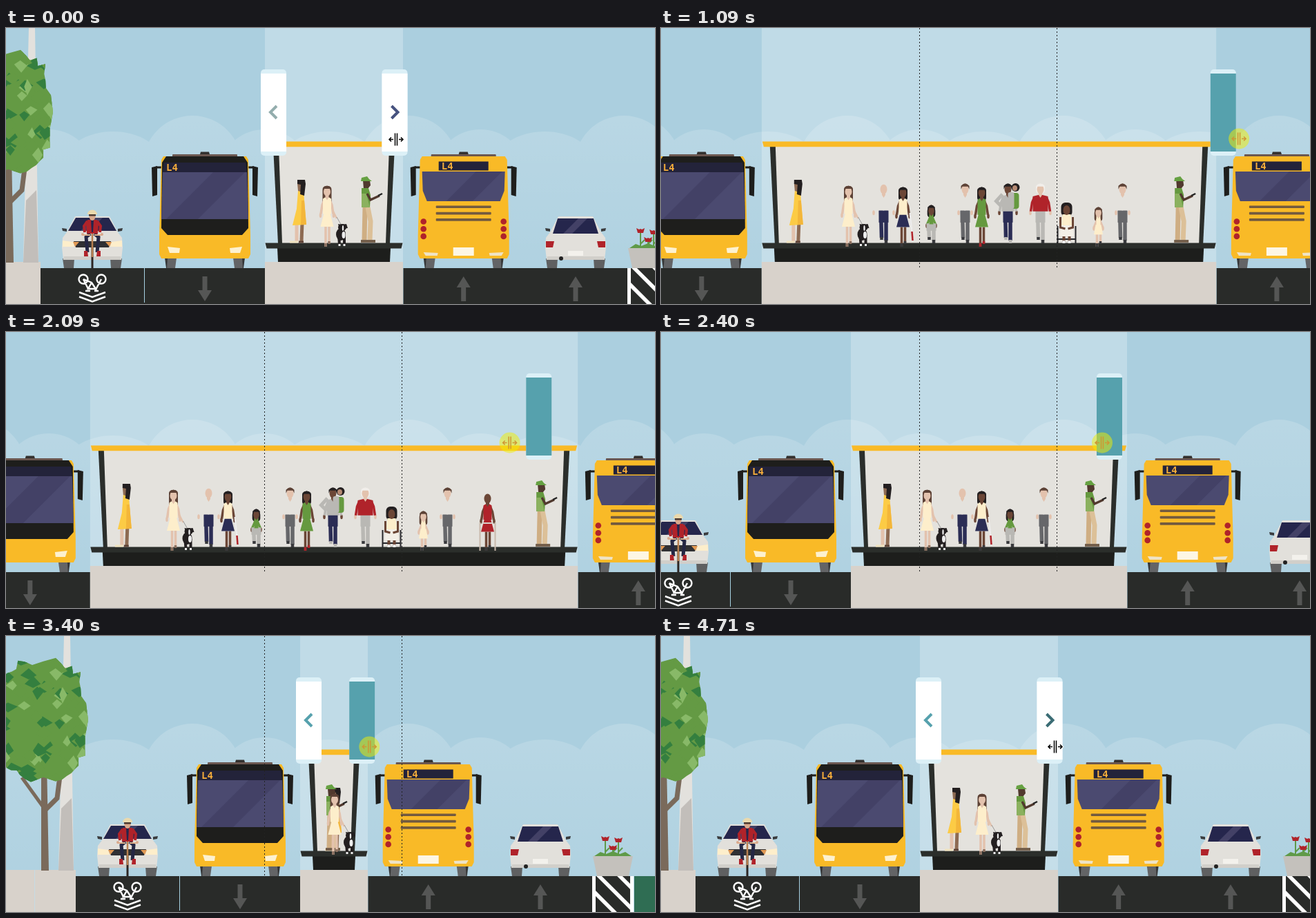
An HTML page that plays this animation: 940 by 400 pixels, repeating every 4.79 s.

```html
<!DOCTYPE html>
<html lang="en">
<head>
<meta charset="utf-8">
<title>Resizing a transit shelter</title>
<style>
html, body { margin: 0; width: 100%; height: 100%; overflow: hidden; background: #abcfdf; }
svg { display: block; width: 100%; height: 100%; }
.led { font: bold 14px "DejaVu Sans Mono", monospace; fill: #f6ad3a; }
</style>
</head>
<body>
<svg id="stage" viewBox="0 0 940 400" xmlns="http://www.w3.org/2000/svg"></svg>
<script>
const LOOP = 4790, START = 170, STEP = 76.9, MID = 475, RELEASE = 57;
const YELLOW = '#f9ba27', ROAD = '#292b29', PAVE = '#d8d2cb', NAVY = '#2b2d55', TEAL = '#56a1ad', GLASS = '#25264c';
const PALE = '#e3c2ad', DARK = '#6b4636', BLACK = '#1e1e1c', CREAM = '#fdeecb', GREEN = '#65993f', RED = '#b0232a';
const GREY = '#66676a', ASH = '#b9b8b4', BROWN = '#5d4236', INK = '#231f20', SAND = '#e9d6a4';

// ---- markup helpers ----
const poly = (fill, pts) => `<polygon fill="${fill}" points="${pts}"/>`;
const rect = (fill, x, y, w, h, r = 0) => `<rect fill="${fill}" x="${x}" y="${y}" width="${w}" height="${h}" rx="${r}"/>`;
const oval = (fill, x, y, rx, ry = rx) => `<ellipse fill="${fill}" cx="${x}" cy="${y}" rx="${rx}" ry="${ry}"/>`;
const line = (color, w, d) => `<path d="${d}" fill="none" stroke="${color}" stroke-width="${w}"/>`;
const at = (x, body) => `<g transform="translate(${x} 0)">${body}</g>`;
const both = body => body + `<g transform="scale(-1 1)">${body}</g>`;
const each = (list, f) => list.map(f).join('');

// Mirrored shape: half widths paired with heights, from top to bottom.
function hull(fill, ...half) {
  const right = [], left = [];
  for (let i = 0; i < half.length; i += 2) {
    right.push(half[i] + ',' + half[i + 1]);
    left.unshift(-half[i] + ',' + half[i + 1]);
  }
  return poly(fill, [...right, ...left].join(' '));
}

function seeded(seed) {
  return () => (seed = seed * 16807 % 2147483647) / 2147483647;
}

// ---- backdrop ----
function clouds() {
  let d = '';
  for (let k = -1; k < 4; k++)
    for (const [x, y, rx, ry] of [[62, 195, 58, 48], [155, 195, 70, 45], [270, 200, 72, 73]])
      d += `M${x + k * 312.5 - rx} ${y}a${rx} ${ry} 0 0 1 ${2 * rx} 0V348h${-2 * rx}z`;
  return `<path d="${d}" fill="url(#haze)"/>`;
}

// ---- vehicles, centred on x = 0 ----
const glare = (x, y0, y1, w) => poly('#434166', `${x},${y0} ${x + w},${y0} ${x + w - (y1 - y0)},${y1} ${x - (y1 - y0)},${y1}`);

const busShell =
  rect('#6b5750', -47, 183, 94, 4, 1) + hull('#33302e', 6, 179.5, 7, 183) +
  both(poly('#353637', '47,333 58,333 56,348 47,348') + poly('#636466', '41,333 54,333 55,348 43,348') +
    line(BLACK, 3, 'M62 202H71') + poly(BLACK, '69,200 77,202 76,244 69,242')) +
  hull(YELLOW, 60, 186, 63, 191, 66, 300, 66, 328, 63, 334);

const busFront = busShell +
  hull(BLACK, 56, 186, 62, 195, 63, 290, 54, 300) + hull('#23233a', 59, 195, 61, 209) +
  hull('#4b4a70', 61, 209, 63, 277) + glare(12, 209, 277, 46) +
  '<text class="led" x="-56" y="206.5">L4</text>' +
  both(poly('#fdf1cf', '36,319 54,317 51,326 37,326'));

const busBack = busShell +
  rect('#23233a', -36, 193.5, 72, 13) + '<text class="led" x="-32" y="205">L4</text>' +
  hull('#4b4a70', 60, 208, 59, 236, 53, 251) + glare(18, 208, 251, 38) +
  each([0, 1, 2], i => rect('#725a3f', -40, 257.5 + i * 9.3, 80, 3.6, 1)) +
  both(each([0, 1, 2], i => oval(RED, 58, 280.5 + i * 10.7, 4.3)) + poly('#efe3c5', '37,326 58,325 55,330 38,330')) +
  rect('#fdf6e4', -15, 318, 30, 12);

const carShell =
  both(poly('#5f6061', '26,334 43,334 41,348 27,348') + poly('#3a3b3d', '37,291 44,290 43,294 37,295')) +
  hull('#e2e0db', 25, 273, 37, 296, 43, 304, 44, 318, 42, 336) + hull('#d1cfca', 41, 331, 42, 336);

const carFront = carShell + hull(GLASS, 24, 275, 35, 294) + glare(2, 275, 294, 13) +
  hull('#303033', 27, 309, 24, 318) +
  both(poly(CREAM, '28,310 43,308 43,317 26,317') + poly('#e29a55', '19,310 28,310 25,317'));

const carBack = carShell + hull(GLASS, 26, 276, 33, 298) + glare(4, 276, 298, 13) +
  both(poly(RED, '31,309 43,309 43,318 33,318')) + rect('#f3f1ec', -11, 323, 22, 7) + oval('#222', -21, 334, 3);

const cyclist =
  line('#2c2523', 3, 'M0 318V348') + line('#b98050', 2.5, 'M0 298V332') +
  both(line('#252744', 5, 'M3 298L9 303L7 325') + poly(RED, '7,323 12,323 12,331 6,331') + line(RED, 4, 'M7 280L12 287L11 296')) +
  hull(RED, 7, 278, 9, 284, 8, 298) + hull(GLASS, 2, 278, 1, 296) +
  both(line('#e0b08c', 2, 'M3 300H15') + oval('#d9a98d', 14, 299, 2)) +
  oval('#d9a98d', 0, 273, 4.5, 6) + rect('#4c3930', -5, 270, 10, 2.5) + '<path fill="#ead9ae" d="M-7 270a7 6.5 0 0 1 14 0z"/>';

const bikeMark = line('#fff', 2.4,
  each([-19.5, 6.5], x => `M${x} 364a6.5 6.5 0 1 0 13 0a6.5 6.5 0 1 0 -13 0`) +
  'M-13 364L-1 369L5 378H-6L-1 369M-6 378L-13 364M13 364L4 381M-10 381H-3M3 381H9' +
  each([383, 389.5], y => `M-19 ${y}L0 ${y + 7}L19 ${y}`));

const arrow = hull('#555655', 3.5, 360, 3.5, 380, 10, 380, 0, 396);
const arrowUp = `<g transform="translate(0 756) scale(1 -1)">${arrow}</g>`;

// ---- street furniture ----
function foliage() {
  const rand = seeded(11), tones = ['#649a44', '#347f3f', '#649a44', '#347f3f', '#88b968'];
  const round = v => Math.sign(v) * Math.abs(v) ** 0.65;
  const blob = (x, y, rx, ry, count, rough) => Array.from({ length: count }, (_, i) => {
    const a = i / count * 2 * Math.PI, r = 1 - rough * rand();
    return `${(x + rx * r * round(Math.cos(a))).toFixed(1)},${(y + ry * r * round(Math.sin(a))).toFixed(1)}`;
  }).join(' ');
  const edge = blob(43, 122, 65, 92, 44, 0.14);
  let shards = '';
  for (let i = 0; i < 75; i++)
    shards += poly(tones[i % 5], blob(rand() * 130 - 22, 34 + rand() * 180, i % 5 < 4 ? 16 : 11, 13, 4, 0.6));
  return `<clipPath id="crown">${poly('#000', edge)}</clipPath>${poly(tones[0], edge)}<g clip-path="url(#crown)">${shards}</g>`;
}

const tree = poly('#7a6a5b', '40,340 40,180 48,180 51,340') +
  line('#7a6a5b', 7, 'M46 252L63 235L70 180') + line('#7a6a5b', 5, 'M43 248L12 205') + foliage();
const pole = poly('#e3e1dd', '73,0 82,0 87,340 65,340') + poly('#c2beba', '69,250 84,235 87,340 65,340');

const tulip = (x, y) => line('#5f9a48', 2, `M${x} ${y}V318m0 -5l6 -6`) +
  at(x, hull(RED, 0, y - 3, 2, y - 2, 6, y - 4, 4, y + 3));
const planter = tulip(-11, 294) + tulip(8, 296) + tulip(0, 307) +
  hull('#5f9a48', 0, 312, 10, 316, 18, 313, 27, 319) + hull('#c4c1bc', 29, 319, 23, 348);

const hatch = rect(ROAD, 0, 348, 60, 52) +
  `<g clip-path="url(#lot)">${line('#fff', 5.5, each([-1, 0, 1], k => `M${5 + 30 * k} 343l60 60`))}</g>` +
  line('#fff', 5, 'M2.5 348V400M57.5 348V400');

// ---- people, centred on x = 0, built from body proportions ----
function fig({ tall = 86, skin = PALE, hair, long = 0, top, sleeve = skin, w = 8, legs, skirt, shoe = '#38393c' }) {
  const foot = skirt ? 317 : 312, up = k => foot - tall * k;
  const head = up(0.91), sh = up(0.79), hip = up(0.55), hem = up(0.33), r = tall > 70 ? 5 : 4.3;
  let out = hair && long ? rect(hair, -r - 1.5, up(1), 2 * r + 3, long, 5) : '';
  out += both(oval(skin, w + 1.5, hip + 3, 1.8, 3.5));
  if (top) out += both(line(sleeve, 3.5, `M${w - 4} ${sh + 2}L${w - 1} ${sh + 9}L${w + 1} ${hip + 1}`));
  if (skirt) {
    out += line(skin, 3.5, `M-2 ${hem}V${foot}M3 ${hem}V${foot - 5}`) + line(shoe, 3.5, `M-2 ${foot - 5}v5M3 ${foot - 8}v4`);
    out += hull(skirt, 4, hip - 2, w + 1.5, hem);
  } else {
    out += line(legs, 5.5, `M-4 ${hip}L-3 ${foot - 8}M3.5 ${hip}V${foot - 4}`) + rect(legs, -7, hip, 14, tall / 5);
    out += line(shoe, 4.5, `M-3 ${foot - 9}v4M3.5 ${foot - 5}v5`);
  }
  if (top) out += hull(top, 3, sh - 2, w - 2, sh, w - 2, hip + 1);
  out += hull(skin, 2.5, head + 4, 2.5, sh - 2, 0, sh + 2) + oval(skin, 0, head, r, r + 2);
  if (hair) out += `<path fill="${hair}" d="M${-r - 1} ${head}v-5q${r + 1} -7 ${2 * r + 2} 0v5l-2 -4h${2 - 2 * r}z"/>`;
  return out;
}

const stick = (color, x, y) => line(color, 2, `M${x} ${y}V317`);

const yellowWoman =
  line(PALE, 5, 'M-4 282V309') + line('#8d6a52', 5, 'M4 282L3 309') + line('#f0e3bf', 3, 'M-14 310H-2') + line(BROWN, 3, 'M-1 310H6') +
  poly('#fccb45', '-2,236 6,236 8,262 10,285 -10,286 -4,262') + poly('#f3b63a', '3,250 7,250 10,285 2,285') +
  poly('#8d6a52', '-3,225 3,225 4,238 -2,236') + poly(INK, '-3,220 8,220 9,226 7,243 1,241 2,227 -3,226');

const dog = line('#999', 1, 'M14 274L22 288') + line(INK, 4, 'M17 300L18 314M25 300V314') +
  oval(INK, 20, 299, 7, 9) + oval(INK, 22, 289, 6, 5) + poly(INK, '16,284 21,285 28,284 30,290 18,291') +
  oval('#eee', 24, 300, 2.5, 5) + oval('#eee', 23, 290, 1.2, 4) + line('#eee', 3, 'M18 313v3M25 313v3');

const woman = { tall: 86, long: 20, hair: INK, skin: DARK };
const greenWoman = fig({ ...woman, top: GREEN, skirt: GREEN, shoe: RED });
const greyMan = fig({ hair: BROWN, legs: GREY });
const girl = fig({ tall: 88, hair: BROWN, long: 28, top: CREAM, skirt: CREAM, shoe: '#8b7060' }) + line(PALE, 2.5, 'M8 264L14 276') + dog;

const hatMan =
  line('#cfae83', 7, 'M-3 260L-4 307') + line('#dcc098', 7, 'M1 260L5 280L4 307') + line('#75604c', 4, 'M-9 309H3M1 309H12') +
  poly('#51392e', '-6,221 4,221 5,228 1,233 -5,233') + poly('#66a142', '-9,222 -8,217 0,215 3,219 7,222') +
  poly(GREEN, '-8,232 2,232 5,242 4,260 -8,260') + poly('#8bb15f', '-8,240 -1,240 4,260 -8,260') +
  line('#51392e', 3.5, 'M0 240L5 249L18 243') + line('#222', 2.5, 'M16 243L22 240');

const seated = line('#26262a', 2, 'M-13 287V312M13 287V312M-13 306H13') +
  both(line(DARK, 4, 'M4 300V310') + line('#eee', 4, 'M4 308v4')) + rect(INK, -8, 253, 16, 20, 6) +
  hull(CREAM, 6, 270, 8, 290) + hull('#f3efe7', 9, 286, 10, 302) + both(line(DARK, 3, 'M9 274V289L2 291')) + oval(DARK, 0, 264, 5, 7);

const carer = fig({ skin: DARK, hair: INK, top: ASH, sleeve: ASH, w: 11, legs: NAVY, shoe: ASH }) +
  line(ASH, 5, 'M-8 241L-17 251L-9 259') + rect(GREEN, 5, 239, 11, 23, 4) + rect(ASH, 0, 238, 9, 24, 3) + oval(INK, 11, 231, 6) + oval('#b58a73', 10, 232, 3.5, 4);

// Each person in line, with the gap to the person before.
const cast = [
  [0, yellowWoman],
  [0, girl],
  [51, fig({ legs: NAVY, w: 13 })],
  [28, fig({ ...woman, top: CREAM, skirt: NAVY }) + line('#eee', 2, 'M10 268L13 296') + line(RED, 2.5, 'M13 295L14 308')],
  [41, fig({ tall: 52, skin: DARK, hair: INK, long: 15, top: GREEN, sleeve: GREEN, legs: ASH, w: 5 })],
  [49, greyMan],
  [24, greenWoman],
  [38, carer],
  [47, fig({ hair: '#f1eeea', long: 14, top: RED, sleeve: RED, legs: ASH, w: 13 })],
  [38, seated],
  [46, fig({ tall: 54, hair: BROWN, long: 18, top: CREAM, skirt: CREAM, w: 5 })],
  [35, greyMan],
  [58, fig({ tall: 83, skin: DARK, top: RED, skirt: RED }) + rect(PAVE, -8, 276, 16, 2) + both(stick('#c9b9ab', 11, 276))],
  [62, fig({ top: NAVY, sleeve: NAVY, legs: GREY, w: 15 }) + stick('#a88d78', 16, 266)],
  [32, greenWoman],
  [41, fig({ tall: 93, top: GREEN, legs: NAVY, w: 9 })],
  [54, fig({ tall: 92, skin: DARK, top: SAND, sleeve: SAND, legs: GREY, w: 10 })],
];

// ---- scene ----
const leftSide =
  rect(PAVE, -900, 339, 575, 61) + rect('#c6dbe3', -385, 339, 1, 61) +
  rect(ROAD, -325, 348, 325, 52) + rect('#a8d3e3', -175, 348, 1, 50) +
  at(-415, pole + tree) + at(-250, carFront + cyclist + bikeMark) + at(-87, busFront + arrow);
const rightSide =
  rect(ROAD, 0.5, 348, 325, 52) + rect('#2f6d53', 386, 348, 500, 52) + at(325, hatch) + at(355, planter) +
  at(87.7, busBack + arrowUp) + at(250, carBack + arrowUp);
const handle = (id, d) => `<g id="${id}">${rect('#dcf0f7', 0, 60, 37, 125, 5)}<rect id="${id}Fill" y="66" width="37" height="113" fill="#fff"/>` +
  `<path id="${id}Mark" d="${d}" fill="none" stroke-width="4"/></g>`;
const arrows = 'M-1.5 -9V9M1.5 -9V9M-4 0H-10M-7 -3L-10 0L-7 3M4 0H10M7 -3L10 0L7 3';

const $ = id => document.getElementById(id);
const set = (id, attrs) => { for (const k in attrs) $(id).setAttribute(k, attrs[k]); };
const show = (id, on) => { $(id).style.display = on ? '' : 'none'; };
const move = (id, x, y = 0) => set(id, { transform: `translate(${x.toFixed(2)} ${y})` });

$('stage').innerHTML =
  `<defs><linearGradient id="haze" x1="0" y1="127" x2="0" y2="348" gradientUnits="userSpaceOnUse">
    <stop stop-color="#fff" stop-opacity=".17"/><stop offset="1" stop-color="#fff" stop-opacity=".06"/></linearGradient>
    <clipPath id="lot"><rect y="348" width="60" height="52"/></clipPath></defs>` +
  rect('#abcfdf', 0, 0, 940, 400) + clouds() +
  '<rect id="glow" height="400" fill="#fff" opacity=".25"/>' +
  `<g id="left">${leftSide}</g><g id="right">${rightSide}</g><g id="shelter"></g>` +
  cast.map(([, body], i) => `<g id="p${i}">${body}</g>` + (i ? '' : `<g id="hat">${hatMan}</g>`)).join('') +
  '<path id="guides" d="M374.5 0V348M573.5 0V348" stroke="#222" stroke-dasharray="2 3"/>' +
  handle('hl', 'M23 113L14 122L23 131') + handle('hr', 'M14 113L23 122L14 131') +
  `<g id="cursor"><circle id="disc" r="15" fill="#f2f000"/><path id="halo" d="${arrows}" fill="none" stroke="#fff" stroke-width="3.5"/>` +
  `<path id="icon" d="${arrows}" fill="none" stroke-width="1.5"/></g>`;

// ---- motion: the pointer follows a few [step, x] points; handle and shelter trail behind it ----
const path = [[0, 565], [5, 675], [7, 728], [17, 895], [20, 895], [27, 665], [29, 639], [34, 525], [40, 514], [44, 543], [51, 565], [56, 565], [59, 571]];

function pointer(n) {
  if (n <= 0) return path[0][1];
  const i = path.findIndex(k => k[0] > n) - 1;
  if (i < 0) return path[path.length - 1][1];
  const slope = j => j >= 0 && path[j + 1] ? (path[j + 1][1] - path[j][1]) / (path[j + 1][0] - path[j][0]) : 0;
  const tangent = j => {
    const a = slope(j - 1), b = slope(j);
    return a * b > 0 ? 2 * a * b / (a + b) : 0;
  };
  const [x0, y0] = path[i], [x1, y1] = path[i + 1], h = x1 - x0, u = (n - x0) / h, v = 1 - u;
  return v * v * (1 + 2 * u) * y0 + u * u * (3 - 2 * u) * y1 + h * u * v * (v * tangent(i) - u * tangent(i + 1));
}
const trail = (n, lag) => pointer(Math.min(n - lag, RELEASE - 2));

const mix = (a, b, k) => 'rgb(' + a.map((v, i) => Math.round(v + (b[i] - v) * k)) + ')';

function drawShelter(L, R) {
  const half = (R - L) / 2;
  const post = poly('#2b2e2b', `${half - 12},172 ${half - 20},172 ${half - 25},312 ${half - 19},312`);
  $('shelter').innerHTML = at(MID,
    rect(PAVE, -half, 339, 2 * half, 61) + hull('#e4e2dd', half - 16, 172, half - 22, 312) + both(post) +
    hull(YELLOW, half - 1, 164.5, half - 3, 172.3) +
    hull('#1d1e1c', half - 18, 319, half - 19, 339) + hull('#2b2e2b', half - 0.5, 311.5, half - 2.5, 319.5));
}

// The middle group keeps its spacing; the first and last gaps share the slack.
function placePeople(L, R) {
  const span = R - L - 102;
  let last = 1, width = 0;
  while (cast[last + 1] && span - width - cast[last + 1][0] >= 108) width += cast[++last][0];
  move('p0', L + 50);
  let x = L + 50 + Math.max(0, (span - width - (last > 1 ? 8 : 18)) / 2);
  for (let i = 1; i < cast.length; i++) {
    x += cast[i][0];
    show('p' + i, i <= last);
    move('p' + i, x);
  }
  move('hat', R - 52);
}

function draw(t) {
  const n = t < START ? -1 : Math.floor((t - START + 9) / STEP);
  const idle = n < 0, drag = !idle && n < RELEASE;
  const R = trail(n, 2) + 10, L = 2 * MID - R;
  const fade = idle ? 1 : drag ? 0 : Math.min(1, (n - RELEASE + 1) / 3);

  set('glow', { x: L, width: R - L });
  move('left', L);
  move('right', R);
  drawShelter(L, R);
  placePeople(L, R);

  show('guides', drag);
  show('hl', n < 2 || n >= 33);
  move('hl', L - 6);
  move('hr', trail(n, 1) - 20.5);
  set('hlMark', { stroke: idle ? '#93adad' : TEAL });
  set('hrFill', { fill: mix([86, 161, 173], [255, 255, 255], fade) });
  set('hrMark', { stroke: idle ? '#46527f' : '#3a6c74' });
  show('hrMark', !drag);

  move('cursor', pointer(n), idle ? 161.5 : 160.5);
  set('disc', { opacity: 0.5 * (1 - fade) });
  show('halo', !drag);
  set('icon', { stroke: drag ? '#cf9634' : '#000' });
}

function tick() {
  draw(performance.now() % LOOP);
  requestAnimationFrame(tick);
}
tick();
</script>
</body>
</html>
```
